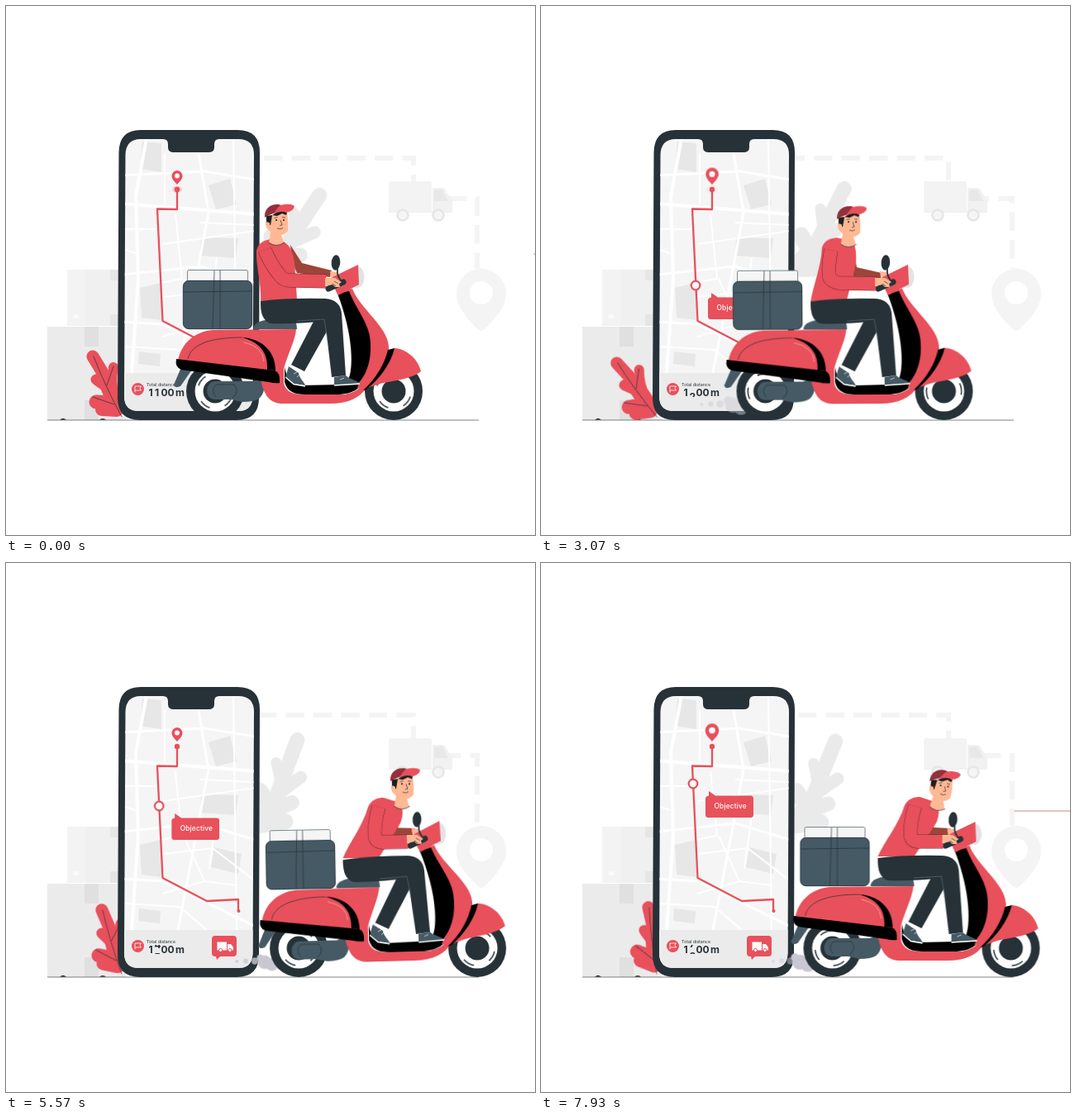
Write an HTML page that moves like this. It is 640 by 640 pixels and loops after 8 s.

```html
<!DOCTYPE html>
<html lang="en">
<head>
<meta charset="utf-8">
<title>Delivery on the way</title>
<style>
html, body { margin: 0; width: 100%; height: 100%; overflow: hidden; background: #fff; }
svg { display: block; width: 100vw; height: 100vh; }
text { font-family: Inter, "Open Sans", sans-serif; }
.red { fill: #e8505b; }
.dark { fill: #263238; }
.slate { fill: #455a64; }
.skin { fill: #ffb894; }
.thin { fill: none; stroke: #263238; stroke-width: .7; }
.blob { fill: none; stroke-linecap: round; stroke-linejoin: round; }

[class*="go-"] { animation: 8s linear infinite; }
.go-dash { animation-name: dash; animation-duration: 2s; }
@keyframes dash { to { stroke-dashoffset: -33.5; } }
.go-spin { animation-name: spin; animation-duration: .8s; }
@keyframes spin { to { transform: rotate(360deg); } }

.go-fern { animation-name: fern; transform-origin: 300px 340px; }
@keyframes fern {
  0% { transform: rotate(14deg); } 15.1% { transform: rotate(11.8deg); }
  38.4% { transform: rotate(7.8deg); } 50% { transform: rotate(4.8deg); }
  61.6% { transform: rotate(2.2deg); } 77.6%, 82% { transform: rotate(0deg); }
  99.1%, 100% { transform: rotate(2.8deg); }
}
.go-plant { animation-name: plant; transform-origin: 140px 497px; }
@keyframes plant {
  0% { transform: rotate(0deg); } 8% { transform: rotate(-8.5deg); }
  15.1% { transform: rotate(-13deg); } 22% { transform: rotate(-14.5deg); }
  38.4% { transform: rotate(-11deg); } 50% { transform: rotate(-4.5deg); }
  61.6% { transform: rotate(3deg); } 77.6% { transform: rotate(13.5deg); }
  99.1%, 100% { transform: rotate(18.5deg); }
}
.go-pin { animation-name: pin; transform-origin: 207px 216px; }
@keyframes pin {
  0% { transform: scale(1); } 9% { transform: scale(1.5); } 15.1% { transform: scale(1.4); }
  23% { transform: scale(1.27); } 29% { transform: scale(1.18); } 33.5% { transform: scale(1.3); }
  38.4% { transform: scale(1.2); } 50% { transform: scale(1.1); }
  61.6%, 87% { transform: scale(1); } 96% { transform: scale(1.12); } 99.1%, 100% { transform: scale(1.28); }
}
.go-halo { animation-name: halo; animation-duration: 2s; transform-origin: 207px 222px; }
@keyframes halo { 0% { opacity: .25; } 70%, 100% { opacity: 0; transform: scale(1.3); } }
.go-track { animation-name: track; }
@keyframes track {
  0%, 15.1% { transform: translate(4px, 87px); } 27% { transform: translate(3.5px, 80.5px); }
  38.4% { transform: translate(3px, 71px); } 50% { transform: translate(2.2px, 56px); }
  61.6% { transform: translate(1.6px, 36px); } 77.6% { transform: translate(.8px, 18px); }
  99.1%, 100% { transform: translate(0, 0); }
}
.go-ring { animation-name: ring; }
@keyframes ring { 0%, 13% { opacity: 0; } 15.1% { opacity: .5; } 18%, 100% { opacity: 1; } }
.go-label { animation-name: label; }
@keyframes label { 0%, 11% { opacity: 0; } 15%, 100% { opacity: 1; } }
.go-digit { animation-name: digit; }
@keyframes digit {
  0%, 17% { transform: translateY(0); } 38.4% { transform: translateY(-10px); }
  50% { transform: translateY(-22.5px); } 61.6% { transform: translateY(-38px); }
  77.6% { transform: translateY(-63px); } 99.1%, 100% { transform: translateY(-97px); }
}

.go-high, .go-low { animation-duration: 2.666667s; }
.go-high { animation-name: high; }
@keyframes high {
  0%, 28% { transform: translateX(-60px); opacity: 0; } 32%, 32.9% { transform: none; opacity: 1; }
  45.4% { transform: translateX(5px); opacity: 1; } 49.5% { transform: translateX(40px); opacity: 1; }
  49.6%, 100% { opacity: 0; }
}
.go-low { animation-name: low; }
@keyframes low {
  0% { transform: translateX(66px); opacity: 1; } 1%, 96.5% { transform: translateX(75px); opacity: 0; }
  96.6% { transform: translateX(-22px); opacity: 1; } 97.4% { transform: none; opacity: 1; }
  100% { transform: translateX(66px); opacity: 1; }
}

.go-ride { animation-name: ride; }
@keyframes ride {
  0% { transform: translateX(0); } 15.1% { transform: translateX(6.5px); } 32.1% { transform: translateX(15px); }
  38.4% { transform: translateX(18.5px); } 44.5% { transform: translateX(24px); } 50% { transform: translateX(34px); }
  54% { transform: translateX(47px); } 61.6% { transform: translateX(79px); } 64.2% { transform: translateX(88px); }
  70% { transform: translateX(102px); } 77.6% { transform: translateX(112.5px); } 82% { transform: translateX(113.5px); }
  90% { transform: translateX(108px); } 99.1% { transform: translateX(99.5px); } 100% { transform: translateX(98.8px); }
}
.go-tilt { animation-name: tilt; transform-origin: 390px 415px; }
@keyframes tilt {
  0%, 32% { transform: rotate(0deg); } 38.4% { transform: rotate(-.3deg); } 50% { transform: rotate(-1.1deg); }
  61.6% { transform: rotate(-1.6deg); } 77.6% { transform: rotate(-1.5deg); } 92%, 100% { transform: rotate(0deg); }
}
.go-crate { animation-name: crate; transform-origin: 256px 385px; }
@keyframes crate {
  0%, 40% { transform: none; } 50% { transform: translateY(-3px) rotate(-4.2deg); }
  58%, 78% { transform: translateX(.5px) rotate(.5deg); } 92%, 100% { transform: none; }
}
.go-smoke { animation-name: smoke; }
@keyframes smoke { 0%, 32% { opacity: 0; } 38.4% { opacity: .5; } 50%, 100% { opacity: 1; } }
.go-puff { animation-name: puff; animation-duration: 1s; transform-box: fill-box; transform-origin: center; }
@keyframes puff { 50% { transform: translateX(-3px) scale(.85); } }
.go-trail { animation-name: trail; }
@keyframes trail {
  0%, 36% { transform: translateX(0); } 50%, 64% { transform: none; opacity: 1; }
  77.6%, 100% { transform: translateX(14px) scaleX(.95); opacity: .5; }
}

.go-head { animation-name: head; transform-origin: 328px 285px; }
@keyframes head {
  0%, 15.1% { transform: none; } 27% { transform: translateX(13px); }
  38.4% { transform: translate(27px, 2px) rotate(1deg); }
  50% { transform: translate(55px, 8px) rotate(2deg); }
  61.6%, 77.6% { transform: translate(54px, 8px) rotate(2deg); }
  99.1%, 100% { transform: translate(53px, 10px) rotate(9deg); }
}
.go-torso { animation-name: torso; }
@keyframes torso {
  0%, 15.1% { d: path("M303 296C305 286 313 283 321 282L337 286C344 290 347 298 349 310L352 355L308 357C309 335 302 315 303 296Z"); }
  38.4% { d: path("M322 292C325 283 332 281 340 280L358 284C363 288 364 300 363 312L352 355L308 357C312 335 321 315 322 292Z"); }
  50%, 100% { d: path("M340 294C344 285 352 283 359 283L377 289C383 294 383 304 379 314L352 355L308 355C316 337 334 315 340 294Z"); }
}
.go-arm { animation-name: arm; }
@keyframes arm {
  0%, 15.1% { d: path("M313 295Q319 311 332 327Q336 332 344 332L387 333"); }
  38.4% { d: path("M333 295Q329 315 331 328Q333 333 343 335L387 336"); }
  50%, 100% { d: path("M353 294Q346 318 348 331Q350 337 358 337L387 337"); }
}
.go-far { animation-name: far; }
@keyframes far {
  0%, 15.1% { d: path("M344 289L358 311L394 320L392 328L352 323L346 310Z"); }
  38.4% { d: path("M360 290L364 316L394 323L393 332L360 330L356 310Z"); }
  50%, 100% { d: path("M374 300L376 320L396 321L394 332L368 331L366 315Z"); }
}
</style>
</head>
<body>
<svg viewBox="0 0 640 640">
  <defs>
    <clipPath id="screen"><path d="M163 161H190Q196 161 196 167V171Q196 177 203 177H245Q252 177 252 171V167Q252 161 258 161H281Q300 161 300 180L298.500 472Q298 490 281 490H161Q143 490 143 472L144.500 180Q145 161 163 161Z"/></clipPath>
    <clipPath id="slot"><rect x="179" y="462.500" width="8" height="10.500"/></clipPath>
    <g id="wheel">
      <circle class="dark" r="35"/><circle r="24.500" fill="#fff"/><circle class="dark" r="14.500"/>
      <g class="go-spin" fill="none" stroke="#263238" stroke-width="1.500">
        <path d="M-20-7A21 21 0 0 0-20 7M20-7A21 21 0 0 1 20 7M-6 20A21 21 0 0 0 7 20"/>
      </g>
    </g>
  </defs>

  <!-- parcels -->
  <path fill="#f0f0f0" d="M74 319H140V387H74Z"/>
  <path fill="#f3f3f3" d="M74 319H97V387H74Z"/>
  <path fill="#e6e6e6" d="M126 319H140V332H126ZM126 373H140V387H126Z"/>
  <rect x="82" y="373" width="6" height="5" fill="#fafafa"/>
  <path fill="#ebebeb" d="M50 388H145V501H50Z"/>
  <path fill="#e0e0e0" d="M95 388H112V412H95ZM95 477H112V501H95Z"/>

  <!-- route, truck and marker -->
  <g class="go-dash" fill="none" stroke="#f4f4f4" stroke-width="6" stroke-dasharray="22.500 11">
    <path d="M278.500 184H493V213"/><path d="M535 233H570V318"/>
  </g>
  <path fill="#f3f3f3" d="M463 215Q463 212 466 212H512Q515 212 515 215V250H463Z"/>
  <path fill="#f1f1f1" d="M516 220H530L540 236V250H463V248H516Z"/>
  <path fill="#e8e8e8" d="M518 222H528L535 236H518Z"/>
  <g fill="#f5f5f5" stroke="#e6e6e6" stroke-width="2.500"><circle cx="480" cy="253" r="6.500"/><circle cx="523" cy="253" r="6.500"/></g>
  <path fill="#f4f4f4" fill-rule="evenodd" d="M575 318A30 30 0 0 1 605 348C605 366 588 382 578 392Q575 394 572 392C562 382 545 366 545 348A30 30 0 0 1 575 318ZM575 333A14 14 0 1 0 575 361A14 14 0 1 0 575 333Z"/>

  <g class="go-fern blob" stroke="#eaeaea">
    <path stroke-width="18" d="M328 276L350 213"/><path stroke-width="13" d="M325 241L332 270"/>
    <path stroke-width="15" d="M327 280L355 258"/><path stroke-width="18" d="M315 302L345 289"/>
    <path stroke-width="20" d="M306 276L318 292L328 284M306 317L337 312M308 308L322 290"/>
  </g>

  <path stroke="#263238" stroke-width=".6" d="M50 501H572"/>
  <path d="M65 500.500Q69 497.500 73 500.500Z"/><path d="M113 500.500Q117 498 121 500.500Z"/>

  <g class="go-plant blob" stroke="#e8505b">
    <path stroke-width="15" d="M134 488Q122 462 116 442L105 424"/><path stroke-width="12" d="M132 475Q126 455 130 437"/>
    <path stroke-width="20" d="M134 484L124 460"/><path stroke-width="13" d="M126 464L109 452"/>
    <path stroke-width="17" d="M130 480L109 479"/><path stroke-width="16" d="M134 489L116 488"/>
    <path class="thin" d="M140 497Q120 460 106 424M122 459L130 436M131 482L105 473"/>
  </g>

  <!-- phone -->
  <path class="dark" d="M163 150H280Q307 150 307 177L306 474Q306 501 279 501H162Q135 501 135 474L136.500 177Q137 150 163 150Z"/>
  <g clip-path="url(#screen)">
    <path fill="#f5f5f5" d="M140 160H302V490H140Z"/>
    <path fill="#e7e7e7" d="M165 164L188 166V201L162 197ZM245 217L271 209L279 240L254 246ZM236 280L281 281L278 305L235 302ZM162 341L187 335L188 380L164 377ZM161 418L187 421L186 436L160 433ZM252 344L285 352L281 376L248 368Z"/>
    <g fill="none" stroke="#fff" stroke-width="3">
      <path stroke-width="4" d="M140 239L302 252M152 444L160 330L157 230L170 160"/>
      <path d="M140 205L240 200L302 210M230 160L245 250L230 330L208 444M140 325L235 315L302 335M140 382L190 385L302 440"/>
      <path stroke-width="2" d="M192 178V240M275 160L279 444M144 270H182M144 295L160 300M190 288L302 272M205 252L213 330L187 335M235 262L302 265M189 352L250 345L302 385M189 400L240 385L280 390M144 412L210 416L243 444M215 330L240 385M255 305L246 370"/>
    </g>
    <path fill="#ebebeb" d="M140 444H302V490H140Z"/>
    <path fill="none" stroke="#e8505b" stroke-width="2.300" stroke-linejoin="round" d="M207 222V246L183 245.500L189.500 381L243 409L281 407V421"/>
    <circle class="red" cx="281.500" cy="421" r="2"/>
    <ellipse class="go-halo red" cx="207" cy="222" rx="6" ry="4"/>
    <circle class="red" cx="207" cy="222" r="3.200"/>
    <path class="go-pin red" fill-rule="evenodd" d="M207 199A6.500 6.500 0 0 1 213.500 205.500C213.500 210 209 213.500 207 216C205 213.500 200.500 210 200.500 205.500A6.500 6.500 0 0 1 207 199ZM207 202.500A3 3 0 1 0 207 208.500A3 3 0 1 0 207 202.500Z"/>
    <g class="go-track">
      <circle class="go-ring" cx="184" cy="267" r="5.300" fill="#fff" stroke="#e8505b" stroke-width="2.200"/>
      <g class="go-label">
        <path class="red" d="M203 276L211 281.500H253.500Q257 281.500 257 285V304.500Q257 308 253.500 308H202.500Q199 308 199 304.500V285Q199 282 203 281.500Z"/>
        <text x="209.500" y="297.300" font-size="8.400" font-weight="500" letter-spacing=".15" fill="#fff">Objective</text>
      </g>
    </g>
    <circle class="red" cx="159.500" cy="463.500" r="7.500"/>
    <path fill="none" stroke="#fff" stroke-width=".8" d="M156 467.500V460H163.500L162 462.500L163.500 465H156"/>
    <text class="dark" x="170" y="460" font-size="5.300">Total distance</text>
    <g class="dark" font-size="12" font-weight="700">
      <text x="172.500" y="472">1</text><text x="187.500" y="472">00</text><text x="205" y="472">m</text>
      <g clip-path="url(#slot)"><g class="go-digit">
        <text x="180" y="472">1</text><text x="179.500" y="487">2</text><text x="179.500" y="502">3</text><text x="179.500" y="517">4</text>
        <text x="179.500" y="532">5</text><text x="179.500" y="547">6</text><text x="179.500" y="562">7</text><text x="179.500" y="577">8</text>
      </g></g>
    </g>
    <path class="red" d="M253 451H275Q279 451 279 455V472Q279 476 275 476H259L255 480L254 476H253Q249 476 249 472V455Q249 451 253 451Z"/>
    <path fill="#fff" d="M255.500 458.500H267V468.500H255.500ZM268 461H272L275 465V468.500H268Z"/>
    <g fill="#fff" stroke="#e8505b"><circle cx="259.500" cy="468.500" r="2"/><circle cx="271" cy="468.500" r="2"/></g>
  </g>

  <path class="go-high" stroke="#6b3436" stroke-width=".8" d="M503 247.400H627"/>
  <path class="go-low" stroke="#b5706a" stroke-width=".8" d="M572 300H697"/>

  <g class="go-ride">
    <g class="go-smoke" fill="#c9c8d2">
      <g class="go-puff"><circle cx="214" cy="483" r="9.500"/><circle cx="224" cy="486" r="9"/><circle cx="208" cy="477" r="5"/></g>
      <g class="go-trail"><circle cx="198" cy="481.500" r="4.200"/><circle cx="187" cy="481.500" r="3"/><circle cx="176" cy="482" r="2"/></g>
    </g>
    <use href="#wheel" x="253" y="466"/><use href="#wheel" x="469" y="466"/>

    <g class="go-tilt">
      <path class="slate" d="M212 437L225 440L211 460Q204 463 203 458Z"/>
      <path class="slate" d="M252 454H298L310 450Q316 466 306 475Q300 479 286 479L272 476H252Q243 475 243 465Q244 455 252 454Z"/>
      <path class="thin" d="M254 458Q247 465 254 473M254 458H276Q283 466 274 474"/>

      <!-- bodywork -->
      <ellipse cx="425" cy="328" rx="8.500" ry="13" fill="#e3e3e3"/>
      <path class="red" d="M208 429C212 408 228 394 250 392L351 391C350 405 338 428 336 440V456C338 467 348 470 360 470H405C420 470 432 462 436 450V462C428 474 414 481 392 481H333C318 480 312 470 308 452L208 432Z"/>
      <path d="M337 437V455C340 467 350 470 362 470H400C420 470 434 462 438 440H425C423 452 416 457 404 458L358 459C346 459 340 452 337 437Z"/>
      <path class="red" d="M404 345L419 342C428 366 462 388 463 412C464 430 446 452 434 464L425 462L438 420Z"/>
      <path d="M401 348L415 345C425 370 441 385 441 410C442 435 432 455 418 463L414 452C420 440 421 400 401 348Z"/>
      <path d="M206 427L325 441Q332 443 331 456Q326 457 318 455L212 440Q204 437 206 427Z"/>
      <path d="M286 401C307 402 326 416 326 441L316 440C317 422 310 408 286 401Z"/>
      <path class="thin" d="M220 427C224 408 250 401 286 401"/>
      <path fill="none" stroke="#f6a9ad" stroke-width=".8" d="M288 407Q311 412 312 430"/>
      <path class="red" d="M434 464C442 440 452 418 470 414C484 415 498 426 502 442C495 448 480 452 462 455C450 457 440 461 434 464Z"/>
      <path d="M462 416L470 414C466 432 452 451 436 464L432 465C448 450 458 433 462 416Z"/>
      <path class="slate" d="M299 390C301 382 310 380 322 379H345Q352 380 352 391H300Z"/>

      <g class="go-crate">
        <rect x="219.500" y="319.500" width="73" height="16" rx="2" fill="#f5f5f5" stroke="#455a64" stroke-width=".7"/>
        <rect class="slate" x="214" y="332" width="84" height="59" rx="7"/>
        <path class="thin" d="M214 346L298 345M252 320L250 391M259 320V391"/>
        <rect class="thin" x="214.300" y="332.300" width="83.400" height="58.400" rx="7"/>
      </g>

      <!-- rider -->
      <path class="go-far" fill="#9c4539"/>
      <path class="skin" d="M392 321L400 322L404 331L393 329Z"/>
      <path class="dark" d="M376 374L393 376L389 392L361 442L345 434Z"/>
      <path class="go-torso red"/>
      <path class="dark" d="M308 357Q340 353 386 354Q404 355 406 372L411 447L394 449L386 381Q350 385 320 384Q307 380 308 357Z"/>
      <path fill="none" stroke="#66747b" stroke-width=".6" d="M352 381L385 379L389 405"/>
      <path class="slate" d="M342 436L354 444C355 451 361 455 362 459L347 457L338 449Z"/>
      <path class="slate" d="M397 449L411 447C415 451 424 453 428 456L427 458L397 459Z"/>
      <path fill="none" stroke="#fff" stroke-width="1.500" d="M338 449L348 457.500L362 460M397 459L428 457"/>
      <path fill="none" stroke="#dfe4e6" stroke-width=".8" d="M348 445L352 443M352 449L355 446M404 452L409 450"/>

      <g class="go-head">
        <path class="skin" d="M316 254L340 250Q342 262 341 272Q337 277 333 277L336 286Q328 293 318 286L320 273Q313 269 314 262Z"/>
        <path class="thin" d="M317.500 286Q327 293 337 286"/>
        <path d="M315 254L322 253L320 265L317 265Q314 260 315 254ZM322 253Q332 246 340 250L339 253L334 251L328 254Z" fill="#1b1f22"/>
        <circle class="skin" cx="316.500" cy="264" r="2.600"/>
        <path d="M324.500 256.500L328.500 255.500M334 255.500L338 256" class="thin"/>
        <circle cx="327" cy="259" r=".9"/><circle cx="336" cy="259" r=".9"/>
        <path class="thin" d="M332 259L334 265L331 265.500M328 269Q332 271 335 268.500"/>
        <path fill="#94303b" d="M313 256C312 245 320 239 330 240L338 243L334 249Q324 249 313 256Z"/>
        <path class="red" d="M332 241Q344 238 349 242Q348 248 339 250Q334 247 324 251Q328 244 332 241Z"/>
      </g>

      <path class="red" d="M395 328L426 313L427 337L402 350Q397 344 395 328Z"/>
      <path class="thin" style="stroke-width:1.800" d="M401 318Q400 326 405 332"/>
      <ellipse class="dark" cx="399" cy="310.500" rx="5.300" ry="9.300" transform="rotate(4 399 310)"/>
      <path class="blob" stroke="#263238" stroke-width="7" d="M390 342L408 334"/>
      <path class="go-arm" fill="none" stroke="#6f2a32" stroke-width="17" stroke-linejoin="round"/>
      <path class="go-arm" fill="none" stroke="#e8505b" stroke-width="16" stroke-linejoin="round"/>
      <path class="skin" d="M386 329L398 329L406 334L403 336L404 340L398 340L395 337L386 339Z"/>
      <path class="thin" d="M397 333L402 336M395 336L399 339"/>
    </g>
  </g>
</svg>
</body>
</html>
```
